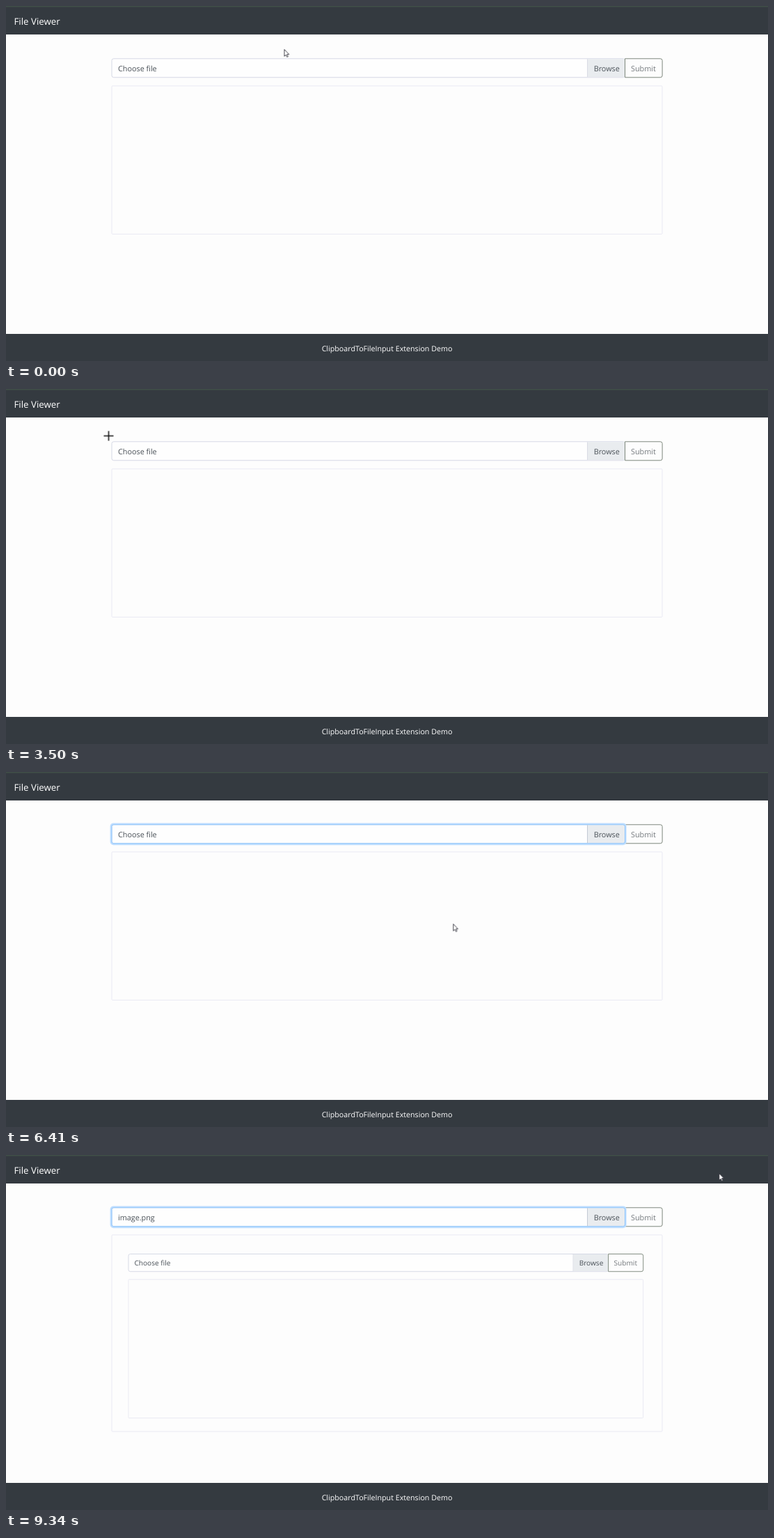
Recreate the animation shown at these times as an HTML page. Size 1095 by 511 pixels, loop 9.37 s.

```html
<!DOCTYPE html>
<html lang="en">
<head>
<meta charset="utf-8">
<title>File Viewer</title>
<style>
  html, body { margin: 0; width: 100%; height: 100%; overflow: hidden; background: #fdfdfd; }
  svg { display: block; width: 100%; height: 100%; }
  text { font: 10.8px "Open Sans", "Noto Sans", sans-serif; fill: #495057; text-rendering: geometricPrecision; }
  .bar { fill: #343a40; }
  .title { font-size: 13.3px; fill: #fff; }
  .footer { font-size: 10.7px; fill: #fff; text-anchor: middle; }
  .field { fill: #fefefe; stroke: #d5d8e5; }
  .browse { fill: #e9ecef; }
  .submit { fill: #fdfdfd; stroke: #7d877c; }
  .muted { fill: #74797d; }
  .viewer { fill: none; stroke: #e9e9f3; }

  .anim { animation: 9370ms infinite step-end; }
  .pointer { animation-name: move; animation-timing-function: ease-in-out; }
  .arrow { animation-name: arrow; }
  .cross { animation-name: cross; }
  .ring { animation-name: focus; }
  .empty { animation-name: before-paste; }
  .filled { animation-name: after-paste; }

  @keyframes move {
    0%, 20.8% { transform: translate(399.5px, 62px); }
    26.1%, 41.1% { transform: translate(147.5px, 67.5px); }
    45.6%, 50.2% { transform: translate(959.5px, 335.5px); }
    56%, 61.9% { transform: translate(770.5px, 95.5px); }
    68.8%, 82.2% { transform: translate(641.5px, 219px); }
    87.5%, 92.4% { transform: translate(983.7px, 323.5px); }
    96.6% { transform: translate(1072px, 4px); }
    99.3%, 100% { transform: translate(1024.3px, 26px); }
  }
  @keyframes arrow { 0% { opacity: 1; } 21% { opacity: 0; } 45.9%, 100% { opacity: 1; } }
  @keyframes cross { 0% { opacity: 0; } 21% { opacity: 1; } 45.9%, 100% { opacity: 0; } }
  @keyframes focus {
    0% { opacity: 0; } 57.1% { opacity: 1; }
    88.6% { opacity: 0; } 97.1%, 100% { opacity: 1; }
  }
  @keyframes before-paste { 0% { opacity: 1; } 69.9%, 100% { opacity: 0; } }
  @keyframes after-paste { 0% { opacity: 0; } 69.9%, 100% { opacity: 1; } }
</style>
</head>
<body>
<svg viewBox="0 0 1095 511">
  <defs>
    <g id="form">
      <rect class="field" x="152" y="75.8" width="737.5" height="27" rx="2.8"/>
      <path class="browse" d="M836 76.3h53.5v26H836z"/>
      <path d="M835.5 76.3v26" stroke="#d9dce4"/>
      <text x="844.7" y="93.8">Browse</text>
      <path class="submit" d="M889.5 75.8H940.3a2.8 2.8 0 0 1 2.8 2.8V100a2.8 2.8 0 0 1-2.8 2.8H889.5z"/>
      <text class="muted" x="898" y="93.8">Submit</text>
    </g>
    <g id="empty-page">
      <use href="#form"/>
      <text x="161" y="93.8">Choose file</text>
      <rect class="viewer" x="152" y="115" width="791" height="213.3" rx="1"/>
    </g>
  </defs>

  <rect width="1095" height="511" fill="#fdfdfd"/>
  <rect class="bar" width="1095" height="41"/>
  <rect width="1095" height="1.5" fill="#414f48"/>
  <text class="title" x="11.5" y="26.6">File Viewer</text>
  <rect class="bar" y="472" width="1095" height="39"/>
  <text class="footer" x="547.5" y="496.6">ClipboardToFileInput Extension Demo</text>

  <use href="#empty-page" class="anim empty"/>
  <g class="anim filled">
    <use href="#form"/>
    <text x="161" y="93.8">image.png</text>
    <rect class="viewer" x="152" y="115" width="791" height="283" rx="1"/>
    <use href="#empty-page" transform="translate(176 142.5) scale(.935) translate(-152 -75.8)"/>
  </g>

  <g class="anim ring" fill="none">
    <rect x="150.8" y="74.6" width="739.6" height="29.4" rx="3.6" stroke="#bfdeff" stroke-width="2.4"/>
    <rect x="152" y="75.8" width="737.5" height="27" rx="2.8" stroke="#8ec5fc"/>
    <path d="M835.5 76.3v26" stroke="#c3cad4"/>
  </g>

  <g class="anim pointer">
    <path class="anim arrow" d="M.5 .5V10.4L2.8 8.3 4.3 11.5 5.8 10.8 4.4 7.6H7.2z" fill="#fff" stroke="#35353f" stroke-width=".9"/>
    <path class="anim cross" d="M-7 0H7M0-7V7" stroke="#111" stroke-width="1.5"/>
  </g>
</svg>
</body>
</html>
```
